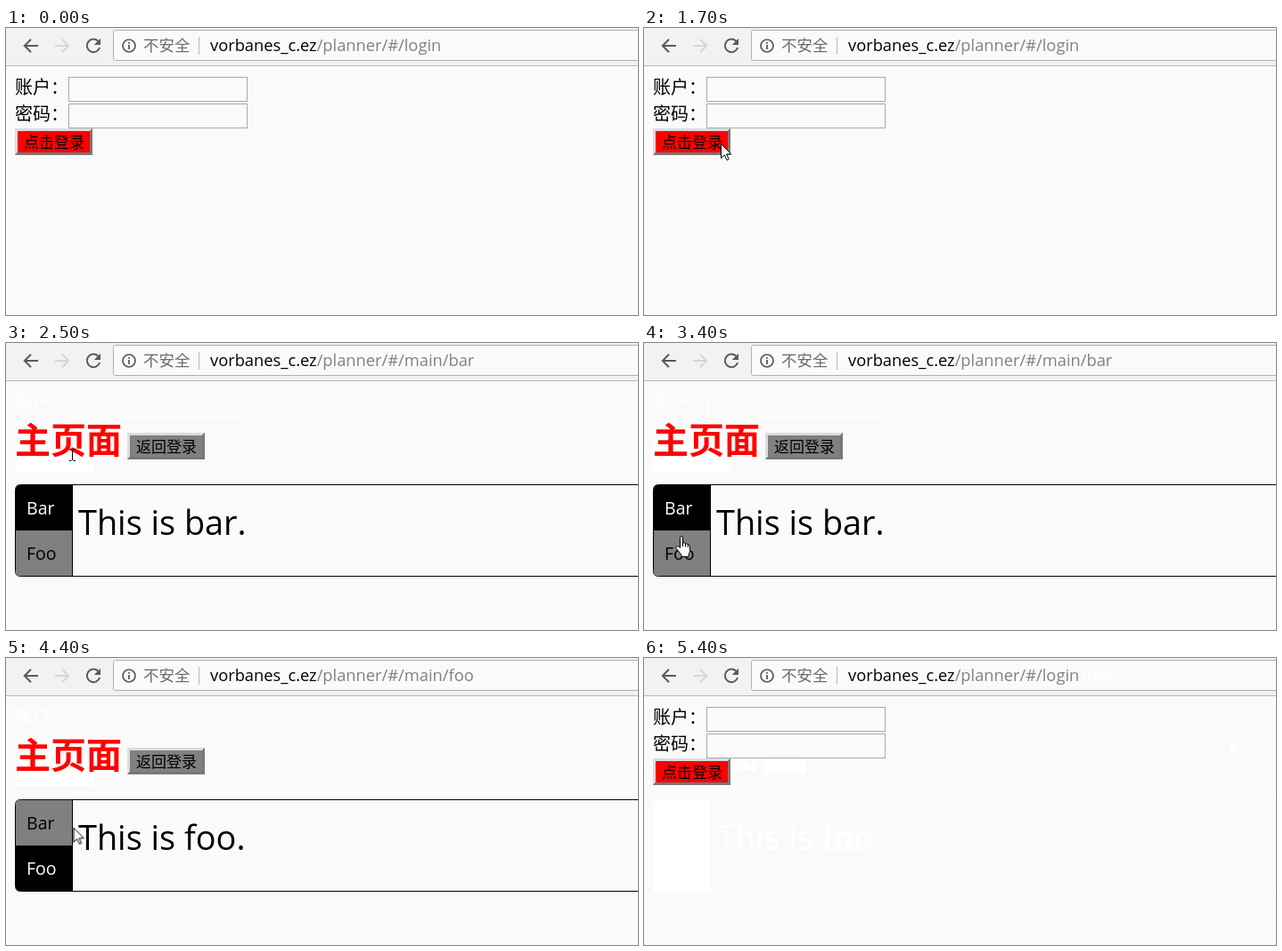
An HTML page that plays this animation: 709 by 323 pixels, repeating every 6.1 s.

```html
<!DOCTYPE html>
<html lang="zh-CN">
<head>
<meta charset="utf-8">
<title>Login routing demo</title>
<style>
html, body { margin: 0; width: 100%; height: 100%; overflow: hidden; background: #fafafa; }
svg { display: block; width: 709px; height: 323px; }
text { font-family: "Open Sans", "Noto Sans CJK SC", "Noto Sans CJK", sans-serif; white-space: pre; }
.cjk { font-family: "Noto Sans CJK SC", "Noto Sans CJK", sans-serif; }
.url { font-size: 18.3px; }
.url tspan { fill: #808080; }
.label { font-size: 20px; }
.btn { font-size: 17px; }
.title { font-size: 40px; font-weight: 700; }
.item { font-size: 19.5px; }
.big { font-size: 37.8px; }
.ghost { fill: #fff; }
.field { fill: #fafafa; stroke: #a9a9a9; }

#login, #main, .bar, .foo, #residue, #focus, #arrow, #beam, #hand, #cursor {
  animation: 6.1s steps(1) infinite;
}
#login { animation-name: login; }
#main { animation-name: main; }
.bar { animation-name: bar; }
.foo { animation-name: foo; }
#residue { animation-name: residue; }
#focus { animation-name: focus; }
#arrow { animation-name: arrow; }
#beam { animation-name: beam; }
#hand { animation-name: hand; }
#cursor { animation-name: move; }

@keyframes login {
  0%, 80.327%, 100% { visibility: visible; }
  39.344% { visibility: hidden; }
}
@keyframes main {
  0%, 80.327%, 100% { visibility: hidden; }
  39.344% { visibility: visible; }
}
@keyframes bar {
  0%, 59.016%, 70.491%, 100% { visibility: hidden; }
  39.344%, 65.573% { visibility: visible; }
}
@keyframes foo {
  0%, 65.573%, 80.327%, 100% { visibility: hidden; }
  59.016%, 70.491% { visibility: visible; }
}
@keyframes residue {
  0% { visibility: hidden; }
  80.327%, 100% { visibility: visible; }
}
@keyframes focus {
  0%, 80.327%, 100% { visibility: hidden; }
  78.688% { visibility: visible; }
}
@keyframes arrow {
  0%, 39.344%, 45.901%, 88.524%, 100% { visibility: hidden; }
  1.639%, 42.622%, 72.131% { visibility: visible; }
}
@keyframes beam {
  0%, 42.622%, 100% { visibility: hidden; }
  39.344% { visibility: visible; }
}
@keyframes hand {
  0%, 72.131%, 100% { visibility: hidden; }
  45.901% { visibility: visible; }
}
/* the pointer advances once every 100 ms */
@keyframes move {
  0%, 1.639% { transform: translate(679px, 91px); }
  3.278% { transform: translate(630px, 150px); }
  4.918% { transform: translate(575px, 192px); }
  6.557% { transform: translate(536px, 173px); }
  9.836% { transform: translate(536px, 173px); animation-timing-function: steps(3); }
  14.754% { transform: translate(548px, 161px); }
  19.672% { transform: translate(548px, 161px); animation-timing-function: steps(3); }
  24.590% { transform: translate(240px, 141px); animation-timing-function: steps(2); }
  27.868% { transform: translate(86px, 130px); animation-timing-function: steps(2); }
  31.147% { transform: translate(74px, 118px); animation-timing-function: steps(3); }
  36.065% { transform: translate(74px, 124px); }
  39.344% { transform: translate(74px, 126px); }
  40.983% { transform: translate(74px, 126px); animation-timing-function: steps(3); }
  45.901% { transform: translate(62px, 165px); animation-timing-function: steps(2); }
  49.180% { transform: translate(57px, 182px); animation-timing-function: steps(2); }
  52.459% { transform: translate(24px, 205px); animation-timing-function: steps(2); }
  55.737% { transform: translate(43px, 217px); }
  59.016% { transform: translate(43px, 217px); animation-timing-function: steps(2); }
  62.295% { transform: translate(44px, 180px); }
  67.213% { transform: translate(44px, 180px); animation-timing-function: steps(2); }
  70.491% { transform: translate(43px, 217px); animation-timing-function: steps(4); }
  77.049% { transform: translate(173px, 112px); }
  81.967% { transform: translate(173px, 112px); }
  83.606% { transform: translate(260px, 127px); animation-timing-function: steps(2); }
  86.885%, 100% { transform: translate(657px, 91px); }
}
</style>
</head>
<body>
<svg viewBox="0 0 709 323">
  <defs>
    <path id="pointer" d="M.5.5v16l3.8-3.6 2.6 5.7 2.3-1-2.6-5.6h5.2z"/>
    <path id="back" d="M36 20H21.500M28 12.800L20.800 20 28 27.200" fill="none" stroke-width="2"/>
    <g id="bevel">
      <path d="M0 0H87L84 3H3V27L0 30z" fill="#dcdce0"/>
      <path d="M87 0V30H0L3 27H84V3z" fill="#777"/>
    </g>
  </defs>

  <rect width="709" height="323" fill="#fafafa"/>

  <!-- browser bar -->
  <rect width="709" height="42" fill="#f2f2f2"/>
  <path d="M0 42.500H709" stroke="#b8b8b8"/>
  <rect x="120.500" y="2.500" width="600" height="34" rx="2" fill="#fafafa" stroke="#b0b0b0"/>
  <use href="#back" stroke="#5a5a5a"/>
  <use href="#back" stroke="#d6d6d6" transform="matrix(-1 0 0 1 91 0)"/>
  <path d="M103.300 14.700A7.300 7.300 0 1 0 105.100 22" fill="none" stroke="#5a5a5a" stroke-width="2"/>
  <path d="M106 11.800V19H98.800z" fill="#5a5a5a"/>
  <circle cx="138" cy="20" r="7" fill="none" stroke="#5a5a5a" stroke-width="1.700"/>
  <path d="M138 19V24M138 16V17.700" stroke="#5a5a5a" stroke-width="1.800"/>
  <text class="cjk" x="154" y="26" font-size="17.500" fill="#6b6b6b">不安全</text>
  <path d="M216.500 10V30" stroke="#b8b8b8"/>

  <!-- faint leftovers of the main page -->
  <g id="residue" class="ghost">
    <text class="url" x="490" y="26">/bar</text>
    <text class="url" x="490" y="26">/foo</text>
    <text class="cjk title" x="90" y="124">面</text>
    <rect x="135" y="99" width="47" height="32"/>
    <rect x="10" y="160" width="65" height="103"/>
    <path d="M75 159.500H709M75 262.500H709" stroke="#fff"/>
    <text class="big" x="81" y="216">This is bar.</text>
    <text class="big" x="81" y="216">This is foo.</text>
    <use href="#pointer" x="657" y="91"/>
  </g>

  <g id="login">
    <text class="url" x="229" y="26">vorbanes_c.ez<tspan>/planner/#/login</tspan></text>
    <text class="cjk label" x="10" y="74">账户：</text>
    <text class="cjk label" x="10" y="104">密码：</text>
    <rect class="field" x="70.500" y="55.500" width="200" height="27"/>
    <rect class="field" x="70.500" y="85.500" width="200" height="27"/>
    <rect x="10" y="113" width="87" height="30" fill="#f00"/>
    <use href="#bevel" x="10" y="113"/>
    <text class="cjk btn" x="20" y="134.500">点击登录</text>
  </g>

  <g id="main">
    <g class="ghost">
      <text class="cjk label" x="10" y="74">账户：</text>
      <path d="M70.500 55.500H270.500V82.500H70.500zM70.500 85.500H270.500V112.500H70.500z" fill="none" stroke="#fff"/>
      <rect x="10" y="113" width="88" height="31"/>
    </g>
    <text class="cjk title" x="10" y="124" fill="#f00">主页面</text>
    <rect x="136" y="101" width="87" height="30" fill="#808080"/>
    <use href="#bevel" x="136" y="101"/>
    <text class="cjk btn" x="146" y="122.500">返回登录</text>
    <path d="M709 159.500H16.500Q10.500 159.500 10.500 165.500V256.500Q10.500 262.500 16.500 262.500H709" fill="none" stroke="#000"/>
  </g>

  <g class="bar">
    <text class="url" x="229" y="26">vorbanes_c.ez<tspan>/planner/#/main/bar</tspan></text>
    <path d="M74 160H16Q11 160 11 165V211H74z"/>
    <path d="M74 211H11V257Q11 262 16 262H74z" fill="#808080"/>
    <text class="item" x="23" y="193" fill="#fff">Bar</text>
    <text class="item" x="23" y="244">Foo</text>
    <text class="big" x="81" y="216">This is bar.</text>
    <path d="M74.500 160V262" stroke="#000"/>
  </g>

  <g class="foo">
    <text class="url" x="229" y="26">vorbanes_c.ez<tspan>/planner/#/main/foo</tspan></text>
    <path d="M74 160H16Q11 160 11 165V211H74z" fill="#808080"/>
    <path d="M74 211H11V257Q11 262 16 262H74z"/>
    <text class="item" x="23" y="193">Bar</text>
    <text class="item" x="23" y="244" fill="#fff">Foo</text>
    <text class="big" x="81" y="216">This is foo.</text>
    <path d="M74.500 160V262" stroke="#000"/>
  </g>

  <rect id="focus" x="136" y="100" width="87" height="31" rx="1.500" fill="none" stroke="#5b9bf0" stroke-width="2"/>

  <g id="cursor" fill="#fff" stroke="#000">
    <use id="arrow" href="#pointer"/>
    <path id="beam" d="M-3-6.500H-.5M1.500-6.500H4M.5-6V6M-3 6.500H-.5M1.500 6.500H4" fill="none"/>
    <path id="hand" transform="translate(-8 0)" d="M5.500 13.500V2Q5.500.5 7 .5T8.500 2V8Q11.500 7.200 11.500 9 14 8.400 14.300 10 16.500 9.800 16.500 11.800V16.500Q16.500 19 15 21V23.500H7V21.500L1.500 14.500Q0 12.500 1.500 11.700T5.500 13.500M8.500 8V12M11.500 9V12.500M14.300 10V13"/>
  </g>
</svg>
</body>
</html>
```
